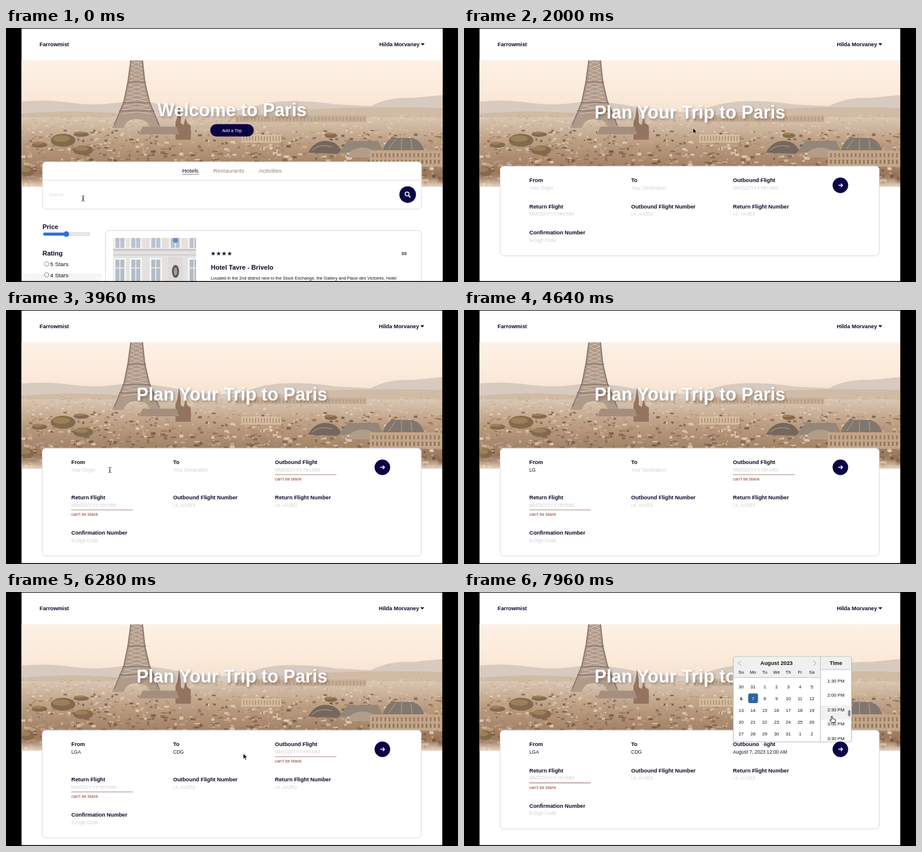
Recreate the animation shown at these times as an HTML page. Size 768 by 432 pixels, loop 8 s.

```html
<!DOCTYPE html>
<html lang="en">
<head>
<meta charset="utf-8">
<title>Trip planner</title>
<style>
html, body { margin: 0; width: 100%; height: 100%; overflow: hidden; background: #000; }
svg { display: block; width: 100%; height: 100%; font-family: "Liberation Sans", Arial, sans-serif; }
.title { font: bold 30.5px "Liberation Sans", Arial, sans-serif; fill: #fff; text-shadow: 2px 2px 4px rgba(0,0,0,.3); }
</style>
</head>
<body>
<svg viewBox="0 0 768 432">
  <defs>
    <linearGradient id="sky" x2="0" y2="1">
      <stop offset="0" stop-color="#fdf1e5"/><stop offset=".45" stop-color="#fcebdb"/><stop offset="1" stop-color="#f3dfcd"/>
    </linearGradient>
    <linearGradient id="town" x2="0" y2="1">
      <stop offset="0" stop-color="#dac6b1"/><stop offset=".35" stop-color="#bd9f83"/><stop offset=".8" stop-color="#9c795c"/>
      <stop offset="1" stop-color="#b3957a"/>
    </linearGradient>
    <linearGradient id="haze" x2="0" y2="1">
      <stop offset="0" stop-color="#ecd9c7" stop-opacity="0"/><stop offset="1" stop-color="#ecd9c7" stop-opacity=".9"/>
    </linearGradient>
    <clipPath id="banner"><rect x="26.4" y="55" width="715.6" height="215"/></clipPath>
    <clipPath id="times"><rect x="606" y="132" width="52" height="122.5"/></clipPath>
    <clipPath id="room"><rect x="182" y="357" width="141" height="74"/></clipPath>
  </defs>
  <rect x="26.4" y="1" width="715.6" height="430" fill="#fff"/>
  <g id="photo" clip-path="url(#banner)"></g>
  <g id="scene"></g>
</svg>
<script>
const LOOP = 8000, NAVY = '#0b0342';
const PAGE_CHANGE = 1720, ERRORS = 3200, CALENDAR = 6700, DATE_PICKED = 7380;
const BRAND = 'Farrowmist', USER = 'Hilda Morvaney', HOTEL = 'Hotel Tavre - Brivelo';

const rect = (x, y, w, h, fill, more = '') =>
  `<rect x="${x}" y="${y}" width="${w}" height="${h}" fill="${fill}" ${more}/>`;
const path = (d, fill, more = '') => `<path d="${d}" fill="${fill}" ${more}/>`;
const line = (d, color, width = 1) => path(d, 'none', `stroke="${color}" stroke-width="${width}"`);
const circle = (x, y, r, fill, more = '') => `<circle cx="${x}" cy="${y}" r="${r}" fill="${fill}" ${more}/>`;
const oval = (x, y, rx, ry, fill) => `<ellipse cx="${x}" cy="${y}" rx="${rx}" ry="${ry}" fill="${fill}"/>`;
const text = (x, y, s, size, fill = '#111', more = '') =>
  `<text x="${x}" y="${y}" font-size="${size}" fill="${fill}" ${more}>${s}</text>`;
const BOLD = 'font-weight="700"', MID = 'text-anchor="middle"';
const bold = (x, y, s, size = 9.25, more = '') => text(x, y, s, size, '#0c0824', BOLD + more);
const range = n => [...Array(n).keys()];

function drawPhoto() {
  let seed = 11;
  const rnd = () => (seed = seed * 16807 % 2147483647) / 2147483647;
  const pick = list => list[Math.floor(rnd() * list.length)];
  let s = rect(26, 55, 716, 110, 'url(#sky)');
  s += path('M26 125Q70 121 110 127T190 127T300 136T420 134T560 130L620 133Q650 117 690 119L742 114V175H26Z', '#d8cabf');
  s += path('M26 146Q120 137 230 148T450 145T742 136V175H26Z', '#d0bba6');
  s += rect(26, 152, 716, 118, 'url(#town)');
  // small rooftops and walls, larger towards the viewer
  const roofs = 1500;
  for (const i of range(roofs)) {
    const depth = i / roofs, y = 147 + 118 * depth;
    const w = 2 + (3 + 7 * depth) * rnd(), h = 1 + (1.5 + 4 * depth) * rnd();
    const tones = depth < .22
      ? ['#e6d5c2', '#cfb79f', '#c2a68c', '#dccab7']
      : ['#ead9c6', '#d9c0a5', '#c9aa8a', '#a5835f', '#80634d', '#69503f', '#a6958a'];
    s += rect((24 + 718 * rnd()).toFixed(1), y.toFixed(1), w.toFixed(1), h.toFixed(1), pick(tones), 'opacity=".75"');
  }
  s += rect(390, 149, 222, 11, '#c6ad95') + rect(400, 181, 68, 14, '#d6bc9f');
  for (let x = 392; x < 610; x += 6) s += rect(x, 152, 2, 6, '#b39a83');
  for (let x = 403; x < 466; x += 5) s += rect(x, 184, 2, 8, '#b2967a');
  // tower
  s += path('M212 55H232L236 92L244 126L250 141L264 170H246Q240 155 222 155T200 170H180L194 141L200 126L207 92Z', '#b09a8a');
  for (let y = 55; y < 140; y += 7) {
    const w = 9 + (y - 55) ** 2 * .0022;
    s += line(`M${222 - w} ${y}L${222 + w} ${y + 7}M${222 + w} ${y}L${222 - w} ${y + 7}`, '#dcc8b5', .9);
  }
  s += line('M212 55L207 92L200 126L184 165M232 55L236 92L244 126L260 165M192 141H252M198 127H246M206 92H238', '#83706a', 1.6);
  // church
  s += path('M288 190V160L291 152L294 131L297 150V162L302 165L305 152L308 162L314 166V190Z', '#93745f');
  s += path('M232 168H290L294 181H226Z', '#a68e7e');
  for (const [x, y, rx, ry] of [[97, 191, 21, 11], [131, 208, 17, 8], [57, 199, 13, 5], [36, 244, 12, 8], [128, 181, 13, 4], [552, 183, 11, 4]])
    s += oval(x, y, rx, ry, '#836a4c') + oval(x - 3, y - 3, rx * .7, ry * .5, '#9c8059');
  // glass roofs
  s += path('M513 212Q524 192 543 192T569 208L564 214Z', '#76675e');
  s += path('M566 212L580 192H632L642 212Z', '#948679');
  s += path('M584 211Q606 195 630 212V220H584Z', '#b29d88');
  s += path('M640 209Q646 188 660 187H690Q704 189 711 209Z', '#82776f');
  s += line('M520 208Q532 196 554 202M650 206L662 189M672 208V188M690 207L688 189', '#b5a697');
  s += rect(618, 208, 124, 28, '#c3a688');
  for (let x = 622; x < 740; x += 7) s += rect(x, 213, 3, 7, '#9b7f67') + rect(x, 224, 3, 7, '#94775f');
  return s + rect(26, 255, 716, 15, 'url(#haze)');
}

function drawRoom() {
  let s = rect(182, 357, 141, 74, '#e4e2e1');
  for (const x of [186, 213, 247, 280, 312]) {
    s += rect(x - 3, 357, 21, 18, '#f3f2f1') + rect(x, 357, 15, 17, '#bac3cd');
    s += rect(x - 3, 391, 21, 40, '#f5f4f3') + rect(x, 394, 15, 37, '#b4bcc4');
    s += line(`M${x + 7.5} 357V374M${x + 7.5} 394V431M${x} 408H${x + 15}`, '#f2f2f2', 1.5);
  }
  s += rect(182, 376, 141, 3, '#c9c7c6') + rect(182, 385, 141, 2, '#d0cccb');
  s += rect(276, 389, 25, 42, '#dedbd8') + oval(288, 414, 6, 11, '#5a5757') + oval(288, 414, 3, 7, '#a19c98');
  s += circle(288, 361, 4.5, '#7188c4');
  return `<g clip-path="url(#room)">${s}</g>`;
}

const header = shift => bold(57, 31, BRAND) +
  text(702.7 - shift, 31, USER, 9.25, '#0c0824', BOLD + ' text-anchor="end"') +
  path(`M${704.8 - shift} 26h6.6l-3.3 3.8z`, '#0c0824');

const panel = (x, y, w, h) => rect(x, y, w, h, '#fff', 'rx="6" stroke="#d8d8dc"');

const ROOM = drawRoom();
function destinationPage(t) {
  let s = header(0) + text(384, 150, 'Welcome to Paris', 30.5, '#fff', `class="title" ${MID}`);
  s += rect(347, 163.5, 74, 21, NAVY, 'rx="10.5"') + text(384, 176.5, 'Add a Trip', 7.4, '#fff', MID);
  s += panel(62, 227.5, 644, 80.5) + line('M62 259H706', '#dcdce0');
  s += text(299.5, 246.3, 'Hotels', 9.8, '#0c0824') + line('M299.5 249H327.5', '#555', .8);
  s += text(352, 246.3, 'Restaurants', 9.8, '#8b8583') + text(429.7, 246.3, 'Activities', 9.8, '#8b8583');
  s += text(72.5, 286.2, 'Search...', 7.8, '#d9d9d9') + circle(682.5, 283.3, 14.1, NAVY);
  s += circle(681.5, 282.3, 3.3, 'none', 'stroke="#fff" stroke-width="1.5"') + line('M684 285L687 288', '#fff', 1.8);
  s += bold(62, 341.8, 'Price', 11) + bold(62, 386.6, 'Rating', 11);
  s += rect(63.5, 348.3, 79, 4.6, '#eee', 'rx="2.3" stroke="#b9b9b9" stroke-width=".7"');
  s += rect(63.3, 348, 40, 5, '#2f70e4', 'rx="2.5"') + circle(102.5, 350.5, 4.8, '#2f70e4');
  ['5 Stars', '4 Stars'].forEach((label, i) => {
    s += circle(69, 401.3 + i * 18.5, 3.8, '#fff', 'stroke="#777" stroke-width=".8"') + text(75, 405 + i * 18.5, label, 9.8);
  });
  s += panel(169, 344.5, 537, 110) + ROOM;
  s += range(4).map(i => text(352 + i * 9.3, 387, '★', 10, '#0c0824', `${MID} style="font-family:'DejaVu Sans',sans-serif"`)).join('');
  s += text(672, 386, '$$', 8) + bold(348, 411, HOTEL, 11);
  s += text(348, 428.2, 'Located in the 2nd district next to the Stock Exchange, the Gallery and Place des Victoires, Hotel', 7.37);
  // link preview in the corner
  const glow = t < 100 ? .05 * (1 - t / 100) : Math.min(1, Math.max(0, (t - 900) / 120));
  s += `<g opacity="${glow.toFixed(3)}">` + rect(26.4, 418, 136, 13, '#3b3b3e', 'rx="2"') +
    text(29, 427.2, 'localhost:4000/destinations/161/trips', 7.5, '#f2f2f2', 'style="font-family:Inter,sans-serif"') + '</g>';
  return s;
}

const typed = (word, t, start) => word.slice(0, Math.max(0, Math.floor((t - start) / 160) + 1));

function tripPage(t) {
  const dated = t >= DATE_PICKED;
  const outError = t >= ERRORS && !dated, returnError = t >= ERRORS;
  const rowY = [0, 44.6 + outError * 15.4, 89.2 + (outError + returnError) * 15.4];
  let s = header(.8) + text(383.8, 153.6, 'Plan Your Trip to Paris', 30.5, '#fff', `class="title" ${MID}`);
  s += panel(61.5, 235, 644, 152.5 + (outError + returnError) * 15.4);
  const fields = [
    ['From', 'Your Origin', typed('LGA', t, 4480)],
    ['To', 'Your Destination', typed('CDG', t, 5640)],
    ['Outbound Flight', 'MM/DD/YYY HH:MM', dated ? 'August 7, 2023 12:00 AM' : '', outError],
    ['Return Flight', 'MM/DD/YYY HH:MM', '', returnError],
    ['Outbound Flight Number', 'i.e. AA353'],
    ['Return Flight Number', 'i.e. AA353'],
    ['Confirmation Number', '9-Digit Code']
  ];
  fields.forEach(([label, hint, value, error], i) => {
    const x = 111 + i % 3 * 173, y = rowY[Math.floor(i / 3)];
    s += bold(x, 262.1 + y, label) + text(x, 274.6 + y, value || hint, 8.2, value ? '#15122a' : '#d2d2d4');
    if (error) s += line(`M${x} ${280 + y}h104.5`, '#a5837e', 1.1) + text(x, 290.3 + y, 'can\'t be blank', 7.4, '#8f3a34');
  });
  if (t >= CALENDAR) s += calendar(t);
  s += circle(639.5, 267.5, 13.2, NAVY) + line('M636 267.5H643M640.2 264.5L643.2 267.5L640.2 270.5', '#fff', 1.3);
  return s + rect(741.3, 0, 1, 432, '#000');
}

function calendar(t) {
  const dark = '#111';
  let s = path('M498 255L505 263L512 255Z', '#fff');
  s += rect(457.5, 110, 201, 145, '#fff', 'rx="3.5" stroke="#aeaeae" stroke-width=".9"');
  s += rect(458, 110.5, 147, 35, '#f0f0f0', 'rx="3"') + rect(606, 110.5, 52, 21.5, '#f0f0f0', 'rx="3"');
  s += line('M458 145.5H605.5M605.5 132H658M605.5 110V255', '#b4b4b4', .8);
  s += line('M471 116.5L466.5 121L471 125.5M593.5 116.5L598 121L593.5 125.5', '#c8c8c8', 1.5);
  s += text(531, 124.2, 'August 2023', 9.25, dark, `${BOLD} ${MID}`) + text(632, 124.2, 'Time', 9.25, dark, `${BOLD} ${MID}`);
  ['Su', 'Mo', 'Tu', 'We', 'Th', 'Fr', 'Sa'].forEach((d, i) => s += text(471 + i * 20, 138.8, d, 7.6, dark, MID));
  if (t >= DATE_PICKED) s += rect(483, 172.5, 16.5, 16.5, '#2d64a0', 'rx="3"');
  for (const i of range(35)) {
    const day = (i + 29) % 31 + 1, picked = i === 8 && t >= DATE_PICKED;
    s += text(471 + i % 7 * 20, 163.6 + Math.floor(i / 7) * 20, day, 7.6, picked ? '#fff' : dark, `${MID} ${i === 7 ? BOLD : ''}`);
  }
  const left = 1 - ease((t - 7680) / 260), scroll = 74 * left;
  let list = '';
  for (const i of range(48)) {
    const y = 200 + (i - 29) * 24.5 + scroll;
    if (y < 115 || y > 270) continue;
    const hour = Math.floor(i / 2), label = `${hour % 12 || 12}:${i % 2 ? '30' : '00'} ${hour < 12 ? 'AM' : 'PM'}`;
    if (t > 7700 && y - 7 <= 211 && y + 17.5 > 211) list += rect(606, y - 7, 52, 24.5, '#f0f0f0');
    list += text(632, y + 2.8, label, 7.8, dark, MID);
  }
  list += rect(652.5, 201 - scroll * .1, 4, 10.5, '#858585', 'rx="2"');
  return s + `<g clip-path="url(#times)">${list}</g>`;
}

const ease = k => (k = Math.min(1, Math.max(0, k)), k * k * (3 - 2 * k));

const CURSORS = {
  arrow: path('M0 0V9.5L2.2 7.5L3.8 11L5.3 10.3L3.8 7H6.8Z', '#000', 'stroke="#fff" stroke-width=".7"'),
  hand: path('M-1 1Q0-1 1 1V4.5L5.2 5.5Q6.8 6 6.3 8L5.3 11H-.5L-3.3 7.5Q-3.8 6-2.4 6.2L-1 7.3Z', '#fff', 'stroke="#000" stroke-width=".9"'),
  beam: line('M-2.5-4.5Q0-4.5 0-3V3Q0 4.5-2.5 4.5M2.5-4.5Q0-4.5 0-3V3Q0 4.5 2.5 4.5M-1.2 .8H1.2', '#333', .9),
  none: ''
};
// time, x, y, shape from then on
const MOVES = [
  [0, 131, 290, 'beam'], [320, 131, 290, 'beam'], [560, 230, 245, 'arrow'], [900, 389, 170, 'hand'],
  [1720, 389, 170, 'arrow'], [2100, 389, 170, 'arrow'], [2700, 637.5, 264, 'hand'], [3300, 637.5, 264, 'arrow'],
  [3850, 176.5, 272, 'beam'], [4480, 176.5, 272, 'none'], [5050, 176.5, 272, 'beam'], [5360, 297, 272, 'beam'],
  [5640, 297, 272, 'none'], [6040, 297, 272, 'arrow'], [6270, 402.7, 274.5, 'arrow'], [6540, 500, 272, 'beam'],
  [6780, 500, 272, 'arrow'], [7200, 490, 180, 'hand'], [7440, 490, 180, 'hand'], [7760, 625, 211, 'hand'], [8000, 625, 211, 'hand']
];
function cursor(t) {
  const i = MOVES.findIndex((m, n) => t >= m[0] && t < MOVES[n + 1][0]);
  const [t0, x0, y0, shape] = MOVES[i], [t1, x1, y1] = MOVES[i + 1];
  const k = ease((t - t0) / (t1 - t0));
  return `<g transform="translate(${(x0 + (x1 - x0) * k).toFixed(2)} ${(y0 + (y1 - y0) * k).toFixed(2)})">${CURSORS[shape]}</g>`;
}

document.getElementById('photo').innerHTML = drawPhoto();
const scene = document.getElementById('scene');
const start = performance.now();
let shown = '';
function frame() {
  const t = Math.max(0, performance.now() - start) % LOOP;
  const next = (t < PAGE_CHANGE ? destinationPage(t) : tripPage(t)) + cursor(t) + rect(0, 430.5, 768, 30, '#000');
  if (next !== shown) scene.innerHTML = shown = next;
  requestAnimationFrame(frame);
}
frame();
</script>
</body>
</html>
```
